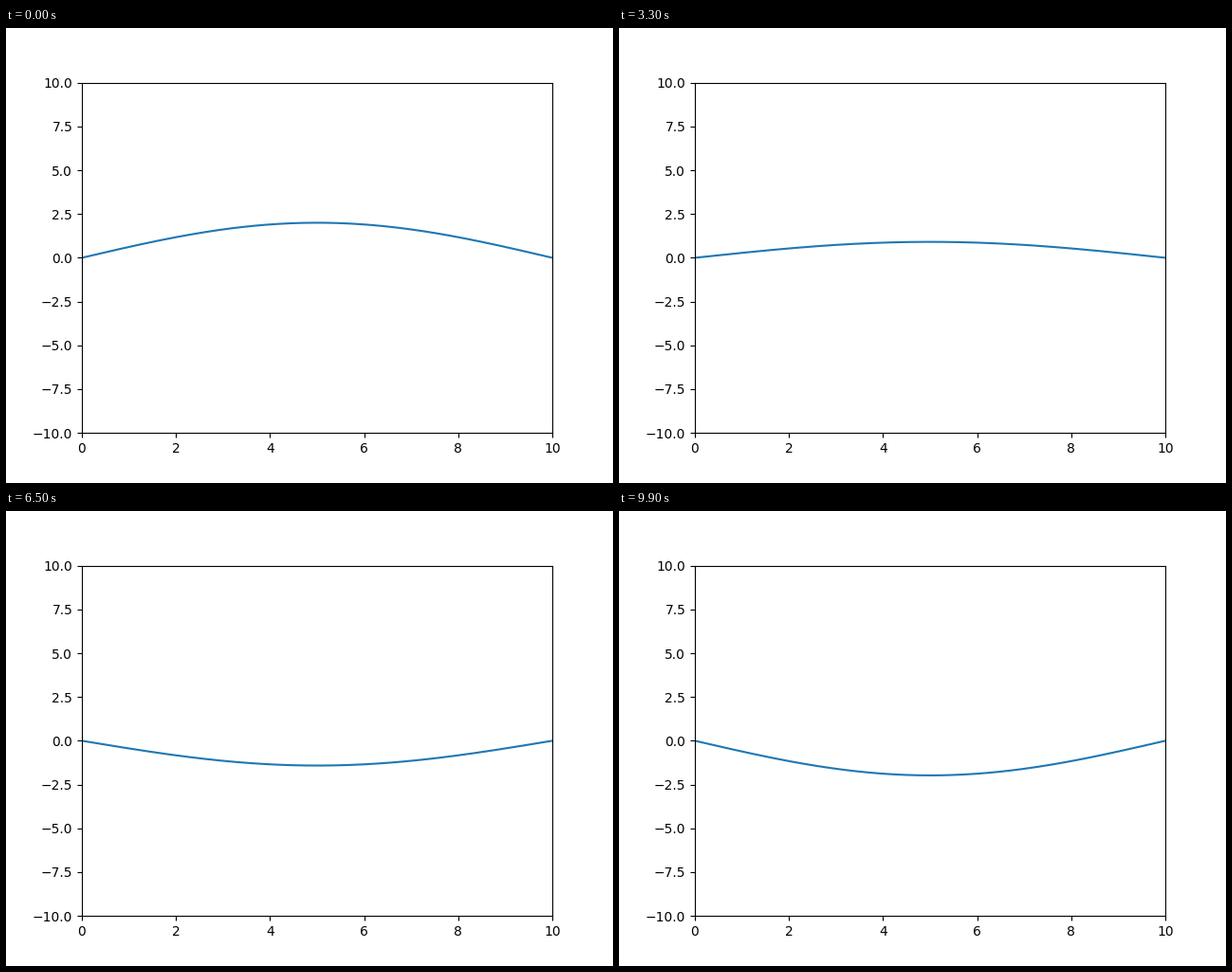
Animation of 640 by 480 pixels, one loop 10 s. Source, as a matplotlib script:

```python
import matplotlib.pyplot as plt
import numpy as np
from matplotlib.animation import FuncAnimation

FRAMES = 100
INTERVAL = 100  # ms
LENGTH = 10
AMPLITUDE = 2
PERIOD = 40  # frames per oscillation

fig, ax = plt.subplots(figsize=(6.4, 4.8), dpi=100)
ax.set_xlim(0, LENGTH)
ax.set_ylim(-10, 10)

x = np.linspace(0, LENGTH, 200)
mode = AMPLITUDE * np.sin(np.pi * x / LENGTH)
line, = ax.plot(x, mode)


def update(i):
    """Fundamental standing wave on a string fixed at both ends."""
    line.set_ydata(mode * np.cos(2 * np.pi * i / PERIOD))
    return line,


anim = FuncAnimation(fig, update, frames=FRAMES, interval=INTERVAL,
                     repeat=True, repeat_delay=0)
plt.show()
```
